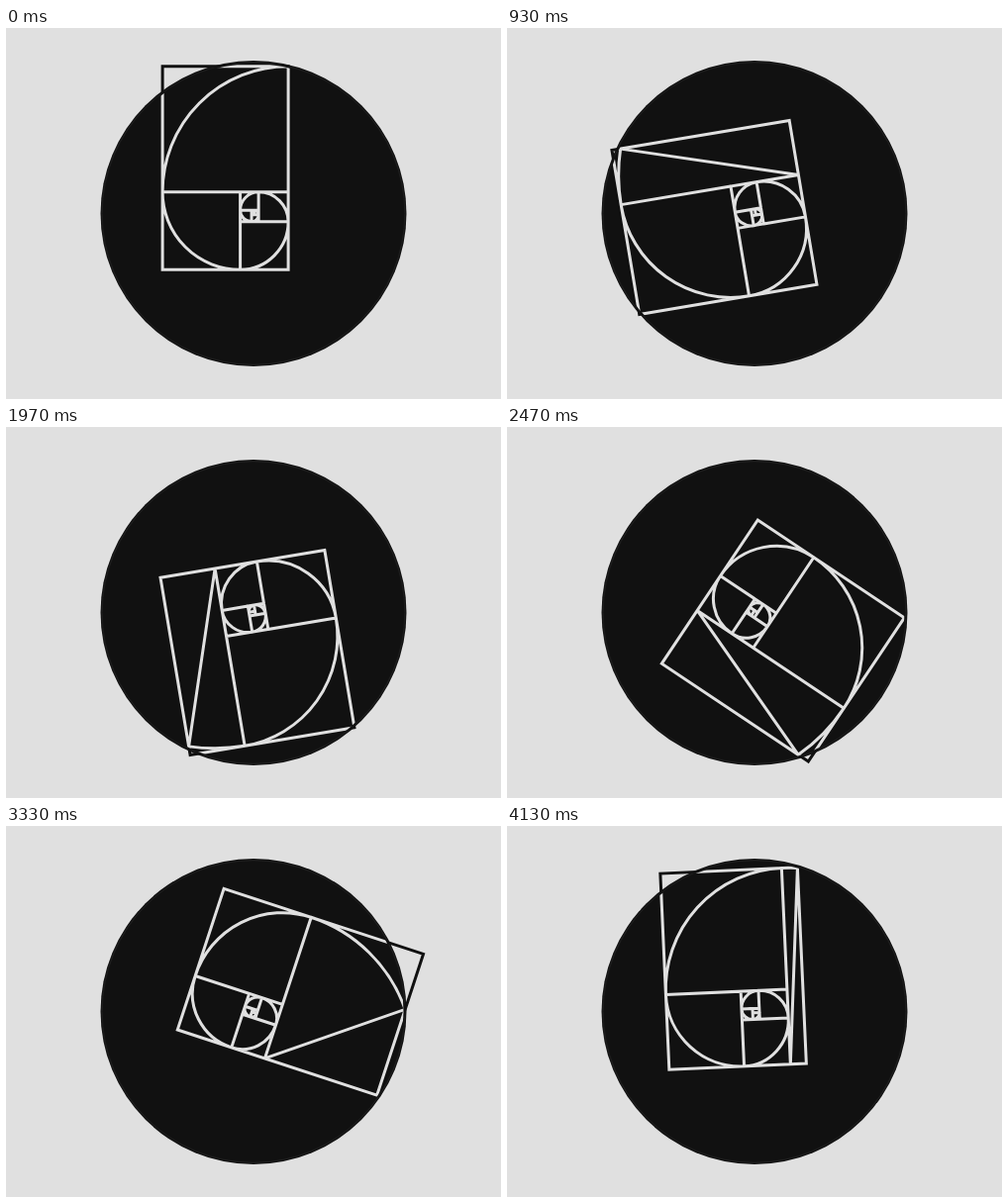
These frames come from a looping animation (500x375 px, 4160 ms). An HTML page:

```html
<!DOCTYPE html>
<html lang="en">
<head>
<meta charset="utf-8">
<title>Golden spiral</title>
<style>
  html, body { margin: 0; width: 100%; height: 100%; overflow: hidden; background: #e0e0e0; }
  svg { display: block; width: 100vw; height: 100vh; }
  path { fill: none; stroke-width: 3; }
</style>
</head>
<body>
<svg viewBox="0 0 500 375">
  <defs><clipPath id="inside"><circle cx="250" cy="187.5" r="151.5"/></clipPath></defs>
  <circle cx="250" cy="187.5" r="154.5" fill="#111"/>
  <circle cx="250" cy="187.5" r="152.8" fill="none" stroke="#1f1f1f"/>
  <path class="spiral" stroke="#111"/>
  <g clip-path="url(#inside)"><path class="spiral" stroke="#e0e0e0"/></g>
</svg>
<script>
const LOOP = 4160, PHASES = 8, PHASE = LOOP / PHASES;
const PHI = (1 + Math.sqrt(5)) / 2;
const SIDE = 127, LEVELS = 8;
const CX = 250, CY = 187.5;

// Edges of the golden rectangle around the spiral's pole, in units of its largest square.
const RIGHT = 1 / (PHI * PHI + 1);
const LEFT = RIGHT - 1;
const DIVIDER = -RIGHT / PHI;
const BOTTOM = DIVIDER + 1 / PHI;

const paths = document.querySelectorAll('.spiral');

function projector(scale, angle) {
  const c = scale * Math.cos(angle), s = scale * Math.sin(angle);
  return (x, y) => `${(CX + x * c - y * s).toFixed(2)} ${(CY + x * s + y * c).toFixed(2)}`;
}

function sector(scale, angle, opening) {
  const at = projector(scale, angle);
  const tip = at(RIGHT - Math.cos(opening), DIVIDER - Math.sin(opening));
  const center = at(RIGHT, DIVIDER), start = at(LEFT, DIVIDER);
  return `M${center}L${start}M${start}A${scale} ${scale} 0 0 1 ${tip}M${tip}L${center}`;
}

function frame(scale, angle, opening) {
  const at = projector(scale, angle);
  const top = DIVIDER - Math.sin(opening);
  return `M${at(LEFT, top)}L${at(RIGHT, top)}L${at(RIGHT, BOTTOM)}L${at(LEFT, BOTTOM)}Z`;
}

// Thirty pictures per second, on a 10 ms grid.
function snap(t) {
  const rest = t % 100;
  return t - rest + (rest >= 70 ? 70 : rest >= 30 ? 30 : 0);
}

function draw(time) {
  const t = snap(time % LOOP);
  const phase = Math.floor(t / PHASE);
  const u = t / PHASE - phase;
  const scale = SIDE / (1 - u * (1 - 1 / PHI));
  const angle = (u - phase) * Math.PI / 4;
  const opening = (1 - u) ** 1.04 * Math.PI / 2; // closes slightly ahead of the turn

  let d = frame(scale, angle, opening);
  for (let i = 0; i < LEVELS; i++) {
    d += sector(scale / PHI ** i, angle - i * Math.PI / 2, i ? Math.PI / 2 : opening);
  }
  paths.forEach(p => p.setAttribute('d', d));
}

const begin = performance.now();
function tick() {
  draw(performance.now() - begin);
  requestAnimationFrame(tick);
}
tick();
</script>
</body>
</html>
```
